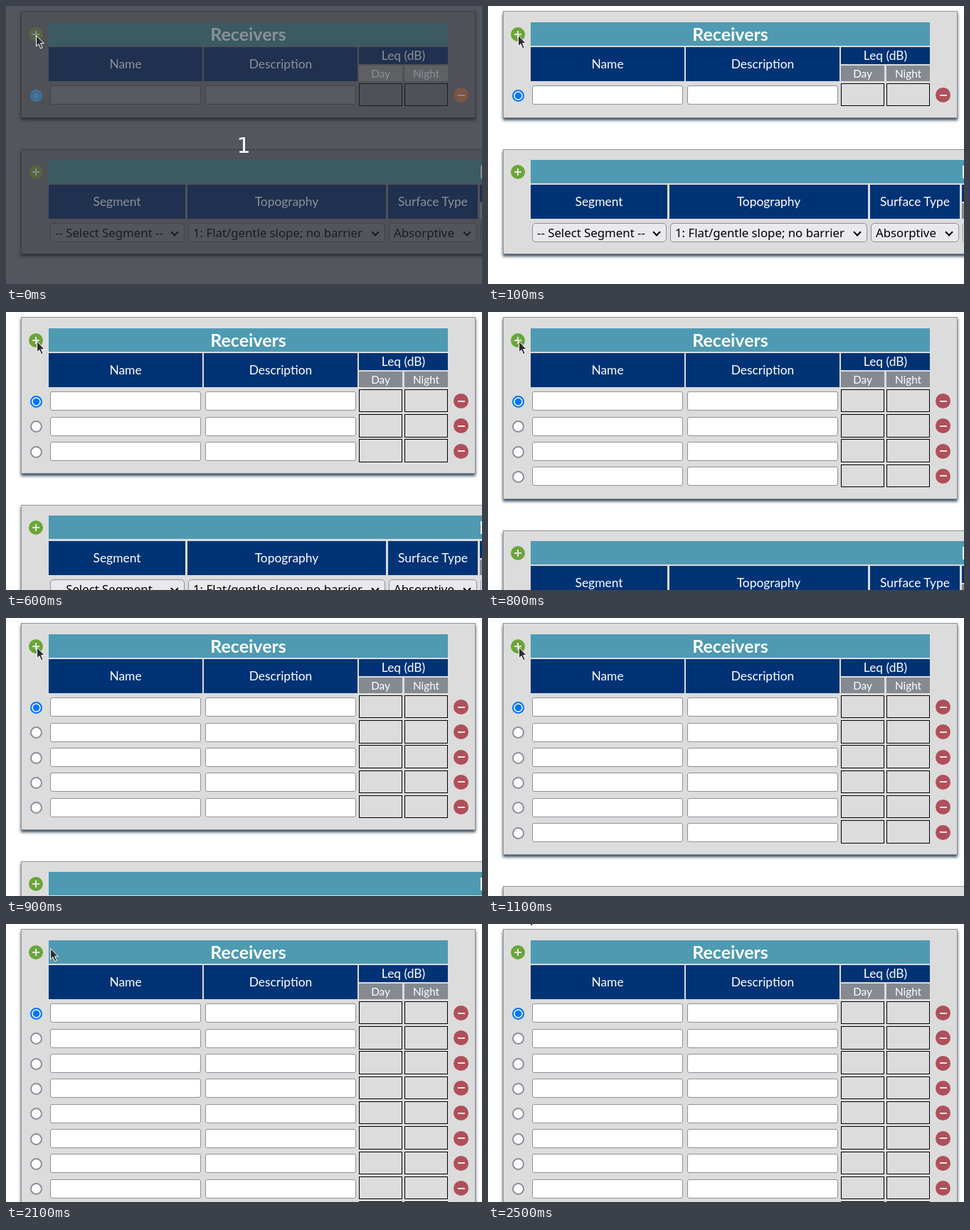
Write an HTML page that moves like this. It is 669 px wide and 392 px high and loops after 2.6 s.

```html
<!DOCTYPE html>
<html lang="en">
<head>
<meta charset="utf-8">
<title>Receiver table</title>
<style>
html, body { margin: 0; width: 100%; height: 100%; overflow: hidden; }

#stage {
  position: relative; box-sizing: border-box;
  width: 669px; height: 392px; padding: 8px 0 0 22px; overflow: hidden;
  background: var(--page); color: var(--text);
  font: 17.4px Lato, sans-serif; white-space: nowrap;
  animation: palette 2600ms step-end infinite;
}
#stage div { box-sizing: border-box; }

.panel {
  position: relative; background: var(--panel);
  box-shadow: 0 0 0 1px var(--rim), 0 3px 4px 1px var(--shade);
}
#receivers { width: 637px; padding: 99px 0 14.4px; }
#segments { width: 700px; height: 146.6px; margin-top: 46px; }
#rows {
  position: relative; height: 35.3px; overflow: hidden;
  animation: grow 2600ms step-end infinite;
}

.at { position: absolute; text-align: center; }
.title { background: var(--teal); font-size: 25px; font-weight: 700; }
.off { padding-left: 605px; text-align: left; }
.head { background: var(--navy); }
.sub { background: var(--gray); font-size: 15.3px; }
.field { background: var(--field); border: 1px solid var(--edge); border-radius: 3px; }
.level { border: 1px solid var(--ink); }
.select {
  padding-left: 6px; text-align: left; color: var(--ink);
  background: var(--select); border: 1px solid var(--edge); border-radius: 5px;
  font: 16.8px "Noto Sans", sans-serif;
}
.select::after {
  content: ""; position: absolute; right: 9px; top: 8px; width: 6px; height: 6px;
  border: solid var(--ink); border-width: 0 2px 2px 0; transform: rotate(45deg);
}
.radio { border: 2px solid var(--edge); border-radius: 50%; background: var(--field); }
.on { border-color: var(--blue); background: var(--blue); box-shadow: inset 0 0 0 1.7px var(--field); }
.plus, .minus { border-radius: 50%; background: var(--green); }
.minus { background: var(--red); }
.plus::before, .plus::after, .minus::before {
  content: ""; position: absolute; inset: 0; margin: auto;
  width: 10px; height: 2px; background: var(--mark);
}
.plus::after { width: 2px; height: 10px; }

#count {
  left: 304px; top: 177px; width: 60px; height: 40px; color: #fff;
  font: 30px/40px "DejaVu Sans", sans-serif; visibility: hidden;
  animation: flash 2600ms step-end infinite;
}
#cursor {
  position: absolute; left: 0; top: 0; width: 14px; height: 22px; overflow: visible;
  animation: point 2600ms step-end infinite;
}

@keyframes palette {
  0% {
    --page: #53565c; --panel: #4f5157; --rim: #3a3d43; --shade: #2d3036;
    --teal: #3b5a62; --navy: #20304f; --gray: #5e6064; --text: #8a9097;
    --field: #575a60; --edge: #3f4248; --select: #53555b; --ink: #1b1d22;
    --green: #56653f; --red: #7c5448; --blue: #3a76a8; --mark: #85898a;
  }
  3.84%, 100% {
    --page: #fff; --panel: #dcdcdc; --rim: #8d949c; --shade: #34475c;
    --teal: #4e9ab2; --navy: #003375; --gray: #848a90; --text: #fff;
    --field: #fff; --edge: #8f8f9d; --select: #e9e9ed; --ink: #000;
    --green: #6ba539; --red: #b04f5a; --blue: #0075ff; --mark: #e6e6e6;
  }
}
@keyframes flash {
  0% { visibility: visible; }
  3.84%, 100% { visibility: hidden; }
}
@keyframes grow {
  0% { height: 35.3px; }
  19.23% { height: 70.6px; }
  23.07% { height: 105.9px; }
  30.76% { height: 141.2px; }
  34.61% { height: 176.5px; }
  42.3% { height: 211.8px; }
  46.15% { height: 247.1px; }
  53.84% { height: 282.4px; }
  65.38%, 100% { height: 317.7px; }
}
@keyframes point {
  0% { transform: translate(42px, 41px); }
  15.38% { transform: translate(43px, 41px); }
  57.69% { transform: translate(43px, 42px); }
  80.76% { transform: translate(62px, 34px); }
  84.61% { transform: translate(105px, 16px); }
  88.46% { transform: translate(156px, -2px); }
  92.3% { transform: translate(110px, -14px); }
  96.15%, 100% { transform: translate(54px, -16px); }
}
</style>
</head>
<body>
<div id="stage">
  <div id="receivers" class="panel"><div id="rows"></div></div>
  <div id="segments" class="panel"></div>
  <div id="count" class="at">1</div>
  <svg id="cursor" viewBox="0 0 14 22">
    <path d="M.5 .5V15.8L4 12.6 6.6 18.8 9.2 17.7 6.6 11.6H11.2Z" fill="#2c2e32" stroke="#fff"/>
  </svg>
</div>
<script>
const byId = id => document.getElementById(id);

function add(parent, kind, x, y, w, h, text = "") {
  const el = document.createElement("div");
  el.className = "at " + kind;
  el.textContent = text;
  el.style.cssText = `left:${x}px;top:${y}px;width:${w}px;height:${h}px`;
  if (text) el.style.lineHeight = (kind === "select" ? h - 2 : h) + "px";
  parent.append(el);
}

const top1 = byId("receivers");
add(top1, "plus", 10, 22, 20, 20);
add(top1, "title", 38, 15, 561, 33, "Receivers");
add(top1, "head", 38, 50, 216, 48, "Name");
add(top1, "head", 256, 50, 216, 48, "Description");
add(top1, "head", 474, 50, 125, 24, "Leq (dB)");
add(top1, "sub", 474, 76, 61, 22, "Day");
add(top1, "sub", 538, 76, 61, 22, "Night");

const rows = byId("rows");
for (let i = 0; i < 9; i++) {
  const y = i * 35.3;
  add(rows, i ? "radio" : "radio on", 12, y + 11, 17, 17);
  for (const x of [40, 258]) add(rows, "field", x, y + 5.4, 212, 27);
  for (const x of [474, 538]) add(rows, "level", x, y + 1.7, 61, 32.6);
  add(rows, "minus", 607, y + 8, 21, 21);
}

const top2 = byId("segments");
add(top2, "plus", 10, 21, 20, 20);
add(top2, "title off", 38, 14, 800, 33, "Roads");
const columns = [
  [38, 192, "Segment", 40, 189, "-- Select Segment --"],
  [233, 279, "Topography", 234, 277, "1: Flat/gentle slope; no barrier"],
  [515, 126, "Surface Type", 516, 124, "Absorptive"]
];
for (const [x, w, name, left, width, choice] of columns) {
  add(top2, "head", x, 49.5, w, 48, name);
  add(top2, "select", left, 103.5, width, 27, choice);
}
add(top2, "head", 644, 49.5, 60, 24);
add(top2, "sub", 644, 75.5, 60, 22);
add(top2, "field", 645, 103.5, 60, 27);
</script>
</body>
</html>
```
